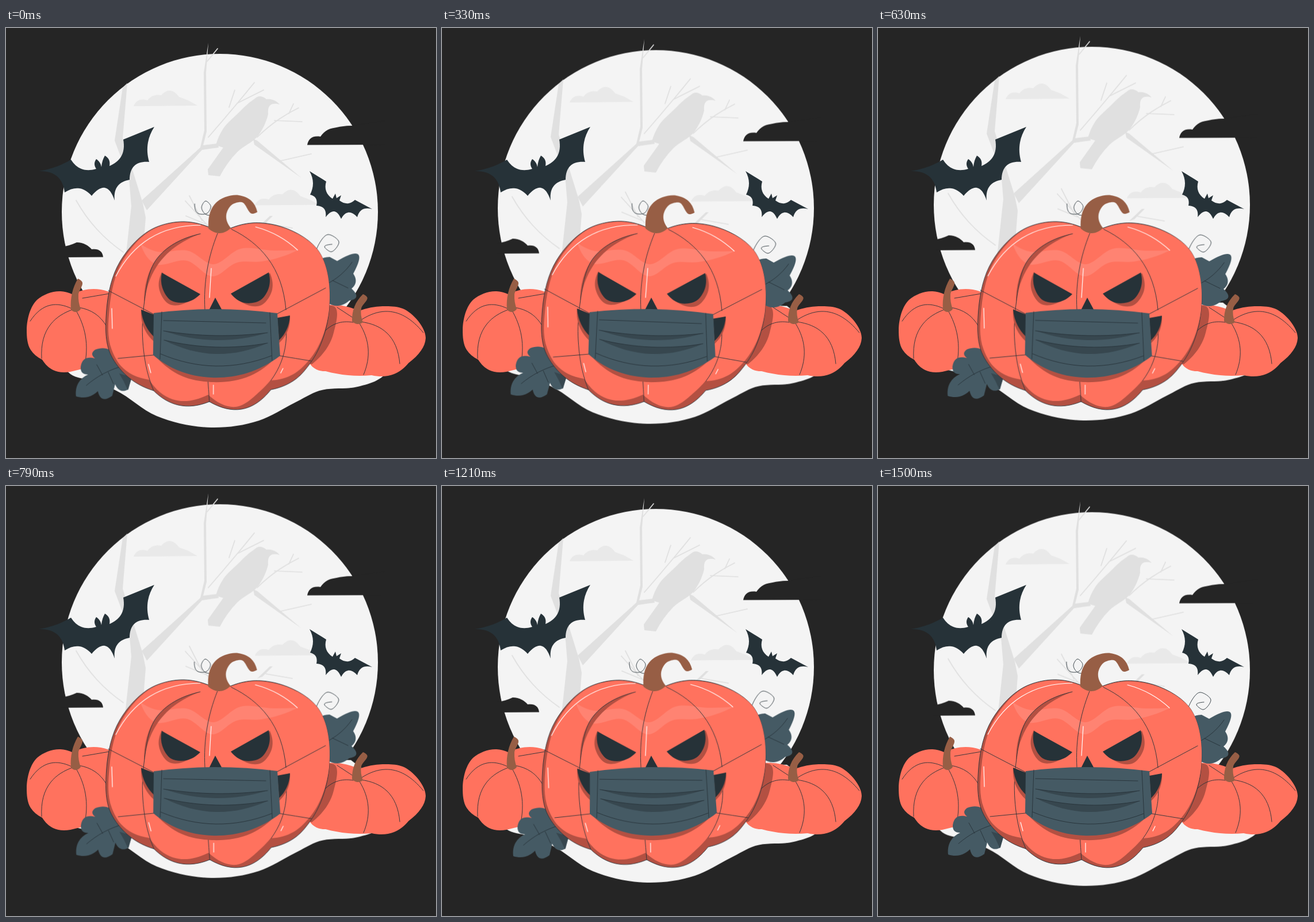
An HTML page that plays this animation: 748x748 px, repeating every 1.54 s.

```html
<!DOCTYPE html>
<html lang="en">
<head>
<meta charset="utf-8">
<title>Masked pumpkin</title>
<style>
html, body { margin: 0; width: 100%; height: 100%; overflow: hidden; background: #252525; }
svg { display: block; width: 100vw; height: 100vh; }
path { stroke-linecap: round; }
.moon { fill: #f4f4f4; }
.night { fill: #252525; }
.ink { fill: #263238; }
.skin { fill: #ff725e; }
.shade { fill: #b35042; }
.rim { fill: #b35042; stroke: #263238; stroke-width: .9; }
.wood { fill: #975e45; }
.cloth { fill: #455a64; }
.fold { fill: #37474f; }
.cloud { fill: #e9e9e9; }
.tree { fill: #e0e0e0; }
.sheen { fill: #fff; opacity: .12; }
.twig { fill: none; stroke: #e0e0e0; stroke-width: 1.7; }
.line { fill: none; stroke: #263238; stroke-width: .9; }
.glow { fill: none; stroke: #fff; stroke-width: 1.2; }
#sky { animation: float 1540ms linear -35ms infinite; }
#jack { transform-origin: 367px 477px; animation: sway 1540ms linear -35ms infinite; }
@keyframes float {
  0%, 100% { transform: translateY(.6px); }
  50% { transform: translateY(-14.4px); }
}
@keyframes sway {
  0%, 100% { transform: rotate(0deg); }
  25% { transform: rotate(.9deg); }
  75% { transform: rotate(-.9deg); }
}
</style>
</head>
<body>
<svg viewBox="0 0 748 748">
  <g id="sky"><circle class="moon" cx="372" cy="320" r="275"/></g>
  <g id="still"></g>
  <g id="jack"></g>
</svg>
<script>
const NS = 'http://www.w3.org/2000/svg';

// Smooth curve through a run of points, as Bezier segments.
function smooth(p) {
  const n = p.length - 1;
  const d = [], v = [], m = [];
  for (let i = 0; i < n; i++) {
    const dx = p[i + 1][0] - p[i][0], dy = p[i + 1][1] - p[i][1];
    d[i] = Math.hypot(dx, dy) || 1;
    v[i] = [dx / d[i], dy / d[i]];
  }
  for (let i = 1; i < n; i++) {
    m[i] = [0, 1].map(k => (v[i - 1][k] * d[i] + v[i][k] * d[i - 1]) / (d[i - 1] + d[i]));
  }
  m[0] = n > 1 ? [0, 1].map(k => 2 * v[0][k] - m[1][k]) : v[0];
  m[n] = n > 1 ? [0, 1].map(k => 2 * v[n - 1][k] - m[n - 1][k]) : v[0];
  return d.map((len, i) => {
    const a = [0, 1].map(k => p[i][k] + m[i][k] * len / 3);
    const b = [0, 1].map(k => p[i + 1][k] - m[i + 1][k] * len / 3);
    return 'C' + [...a, ...b, ...p[i + 1]].map(x => x.toFixed(2)).join(' ');
  }).join('');
}

// "/" marks a sharp corner, ";" starts a new stroke.
function trace(text) {
  return text.split(';').map(stroke => {
    let last, d = '';
    for (const part of stroke.split('/')) {
      const run = part.trim().split(' ').map(s => s.split(',').map(Number));
      if (last) run.unshift(last);
      else d = 'M' + run[0].join(' ');
      if (run.length > 1) d += smooth(run);
      last = run[run.length - 1];
    }
    return d;
  }).join('');
}

const pen = id => (cls, text, move) => {
  const el = document.createElementNS(NS, 'path');
  el.setAttribute('class', cls);
  el.setAttribute('d', trace(text));
  if (move) el.setAttribute('transform', move);
  document.getElementById(id).append(el);
};
const sky = pen('sky'), still = pen('still'), jack = pen('jack');

// Moonlit backdrop
sky('moon', '140,480/97,585 112,602 150,614 190,630 262,675 357,695 440,683 502,652 545,631 612,624 645,613 690,560/600,490');
const puff = '222,136 229,127 246,126/256,118 270,117/284,109 301,120/317,126/333,135';
sky('cloud', puff);
sky('cloud', puff, 'translate(211 172.5)');
sky('tree', '203,104/211,96/203,192/238,305/243,330/236,420/206,420/218,310/214,262/189,196');
sky('tree', '236,300/338,208/345,178/344,78/352,26/348,78/349,180/343,204/368,201/370,208/341,212/245,317');
sky('tree', '476,133 464,125 453,124/440,119 430,125 402,150 378,175 365,204/378,208/351,246/352,256/372,258/402,216 438,188 456,150/460,134 476,133');
sky('tree', '430,193/437,196/514,261/432,203');
sky('tree', '437,348/459,327/464,327/446,345');
sky('twig', '350,58 368,36;352,190 404,129 432,95;398,108 388,138;402,131 448,108');
sky('twig', '437,190 476,158 509,139;492,149 500,132;467,161 515,163;478,231 531,219');
sky('twig', '122,300 158,350 204,390;312,301 352,345;319,292 341,335;313,327 347,341;452,340 498,348');
sky('night', '524,203.5 529,193 547,189/560,177 575,173 603,170/660,162/660,203');
sky('night', '96,381/110,378 123,373/139,377 149,385/165,389 169,398.5/96,399');

// Bats
still('ink', '57,249 88,241 113,229/131,245 157,245/154,236 157,228/163,234 166,242/168,231 172,222/179,229 180,240/200,224 204,194/258,172/247,199 249,233/223,240 215,264/195,274 189,300/172,278 149,292/128,279 102,286/90,259 57,249');
still('ink', '528,249/557,267/557,284 568,297/573,288/575,296/583,291/580,300/596,305 607,299/637,315/618,317 611,329/595,321 583,332/571,319 556,329/553,314 540,309/538,295 529,290/534,270 528,249');

// Small pumpkins
still('skin', '115,463 95,458 55,472 36,525 43,560 63,577/82,595 112,598/145,590 192,580/192,465/165,455 115,463');
still('line', '118,489 78,515 62,575;121,490 138,535 136,590;126,486 155,497 178,525;114,488 78,482 42,510;133,470 180,462');
still('wood', '113,490 115,461 125,436/132,441 126,464 130,489/121,494 113,490');
still('skin', '527,582/555,482/585,483 614,492/655,484 690,488 730,540 700,583/675,602 636,604/595,604 556,597/540,594 527,582');
still('shade', '555,482/570,484 570,530 532,585/520,580');
still('line', '604,512 575,514 552,530;615,514 630,558 622,603;617,511 662,530 685,584;619,507 660,493 726,530;576,486 605,505');
still('wood', '602,510 606,485 621,463/628,468 618,488 621,512/611,515 602,510');

// Leaves and tendrils
jack('cloth', '545,425 546,404 563,398/576,405/613,394 604,427/608,443 601,453/609,468 597,474/577,483 558,477/540,455');
jack('line', '556,446 581,430 602,407;568,439 595,452');
jack('line', '540,418 543,378 560,359 579,372 565,389 554,380 567,376');
jack('cloth', '192,570/175,558 155,560/150,567 155,575/136,577 130,590/133,600 143,603/126,618 122,641/143,642 160,632/168,645 185,640/190,620/200,631 213,629/219,607/205,575');
jack('fold', '197,601/219,608/212,630/205,615');
jack('line', '140,622 169,602 204,588;168,604 158,586;178,599 187,619');
jack('line', '328,306 333,322 350,322 356,310 347,301 340,312 347,324 357,326');

// Big pumpkin
jack('rim', '352,346/310,337 260,347 198,407 175,490 183,570 211,606 257,631/300,656 354,650/410,663 461,629/505,610 530,582 562,490 540,383 470,343 428,339 391,348');
jack('skin', '352,347/310,338 260,348 203,405 180,488 184,560 200,588 249,612/290,646 352,638/400,659 444,630 460,613/500,602 527,578 562,490 540,383 470,344 428,340 391,349');
jack('sheen', '234,376 258,388 318,388 360,411 408,384 466,387 508,386/445,406 402,408 360,432 315,405 258,410 234,376');
jack('shade', '338,358 262,402 240,482/262,415 338,358');
jack('line', '338,358 262,402 240,482 238,545 250,612 257,631;368,357 350,420 346,490;351,607 354,650');
jack('line', '392,350 455,400 487,490;487,515 479,580 461,613');
jack('glow', '191,432 250,366 338,343;434,346 474,362 507,386;357,418 354,469;184,488 185,523;248,585 252,600;361,621 361,637;478,600 482,592');
jack('line', '178,457 257,498;195,575 257,569;556,452 472,497;476,570 531,579');
jack('wood', '352,349 365,304 405,291 426,300 437,320/429,323 410,303 392,308 383,325 391,348/371,357 352,349');

// Face
jack('shade', '271,425 266,452 283,480 321,474/300,445');
jack('shade', '459,426 463,455 446,481 400,471/440,445');
jack('ink', '271,426/338,463/314,477 287,474 272,452 271,426');
jack('ink', '457,425/391,462/415,478 443,473 457,452 457,425');
jack('ink', '364,469/353,491/376,491');
jack('shade', '235,490 242,526 258,546/258,500');
jack('shade', '494,500 488,531 474,549/472,505');
jack('ink', '235,490/258,499/257,537/243,518 235,490');
jack('ink', '494,500/472,504/475,543/488,525 494,500');

// Mask
jack('shade', '262,573/305,605 358,616 425,605 472,570');
jack('cloth', '257,496/360,489 472,496/477,570/420,600 357,608 300,596 256,569/257,496');
jack('fold', '274,527/365,535 455,530/365,543 274,527');
jack('fold', '275,543/365,555 455,548/365,567 275,543');
jack('line', '271,494 268,576;459,495 463,578;274,509 452,513;274,527 365,535 455,530;275,543 365,555 455,548;269,567 365,588 462,570');
</script>
</body>
</html>
```
